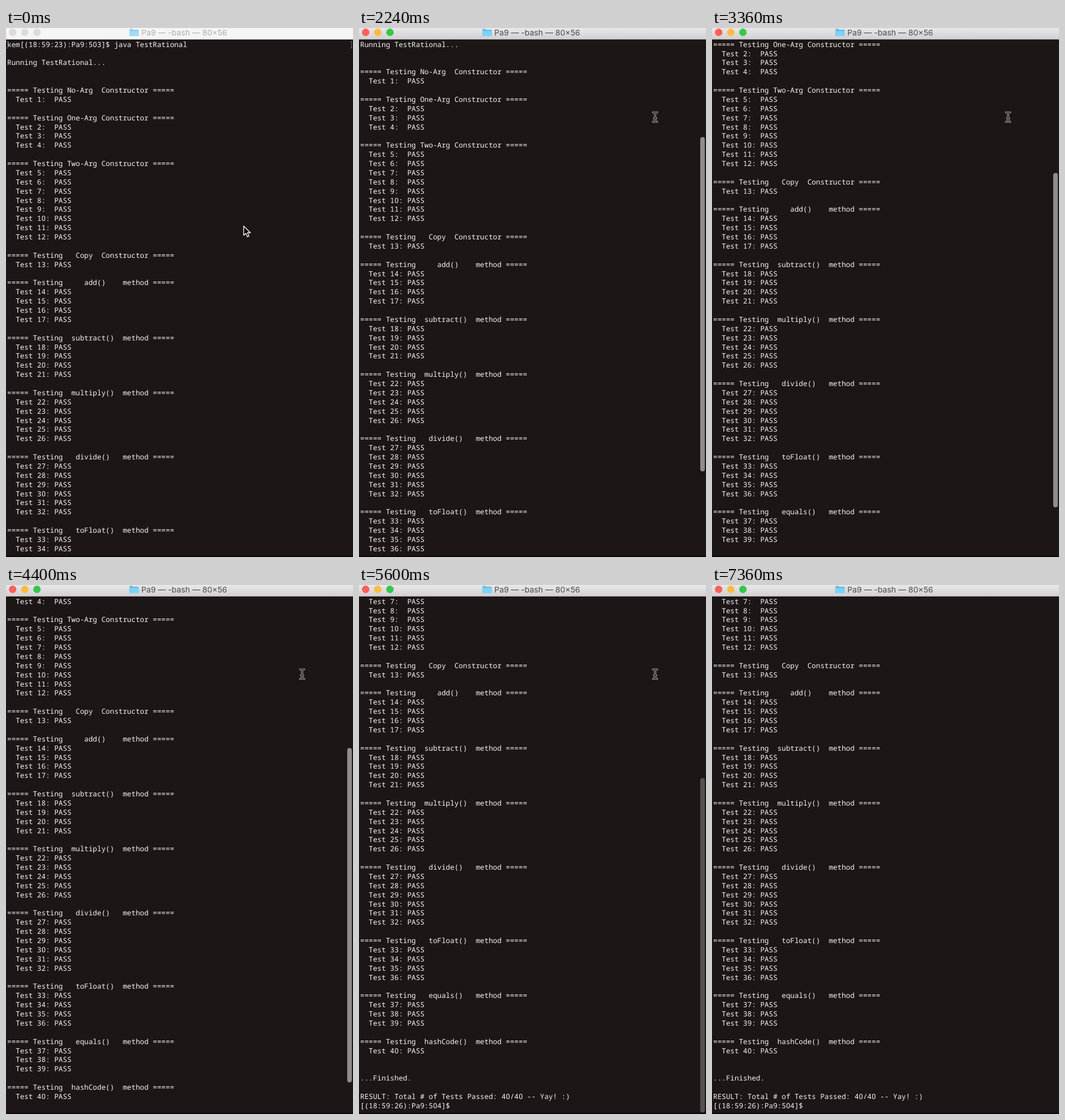
An HTML page that plays this animation: 600x916 px, repeating every 7400 ms.

```html
<!DOCTYPE html>
<html lang="en">
<head>
<meta charset="utf-8">
<title>Terminal test run</title>
<style>
html, body { margin: 0; width: 100%; height: 100%; overflow: hidden; background: #1c1716; }
#stage { position: relative; width: 600px; height: 916px; overflow: hidden; background: #1c1716; }
#stage > * { position: absolute; }
#bar { left: 0; top: 0; width: 600px; height: 19px; background: #f6f5f6; border-bottom: 1px solid #d2d0d1; }
#bar.on { background: linear-gradient(#e9e7e9, #d2d0d2); border-color: #a9a6a8; }
#bar i { position: absolute; top: 1px; width: 13px; height: 13px; border-radius: 50%; background: #dcdbdc; }
#bar.on i { background: var(--c); }
#bar svg { position: absolute; left: 213px; top: 1px; opacity: .7; }
#bar span {
  position: absolute; left: 234px; top: 0; line-height: 16px; white-space: pre;
  font: 13.7px/16px Inter, Roboto, sans-serif; color: #aeadae;
}
#bar.on svg { opacity: 1; }
#bar.on span { color: #4b494b; }
#text {
  left: 2px; top: 20.7px; width: 598px; height: 889px; margin: 0; overflow: hidden;
  font: 12.35px/15.87px "Noto Sans Mono", "DejaVu Sans Mono", monospace;
  text-rendering: geometricPrecision; color: #f6f5f5;
}
#text b { display: inline-block; width: .6em; text-align: center; font: 12.35px/1 Roboto, sans-serif; }
.mark { top: 23px; width: 2px; height: 10px; border: 1px solid #8d8988; }
#open { left: -1px; border-right: 0; }
#close { left: 595px; border-left: 0; border-color: #6f6a69; }
#thumb { left: 590px; top: 168px; width: 8px; height: 579px; border-radius: 4px; background: #8f8c8b; }
#foot { left: 0; top: 914px; width: 600px; height: 2px; background: #080606; }
.pointer { left: 0; top: 0; overflow: visible; }
</style>
</head>
<body>
<div id="stage">
  <pre id="text"></pre>
  <div id="open" class="mark"></div>
  <div id="close" class="mark"></div>
  <div id="thumb"></div>
  <div id="foot"></div>
  <div id="bar">
    <i style="left:5px;--c:#fc605b"></i>
    <i style="left:26px;--c:#fdbc40"></i>
    <i style="left:47px;--c:#34c84a"></i>
    <svg width="17" height="14" viewBox="0 0 17 14">
      <path d="M0.5 12V1.5q0-1 1-1h4.2l1.5 1.6h8.3q1 0 1 1V12q0 1-1 1h-14q-1 0-1-1z" fill="#5fbfe9"/>
      <path d="M0.5 4.2h16V12q0 1-1 1h-14q-1 0-1-1z" fill="#7dd2f7"/>
    </svg>
    <span>Pa9 — -bash — 80×56</span>
  </div>
  <svg id="arrow" class="pointer" width="14" height="22">
    <path d="M0 0v16l3.8-3.5 2.6 6.2 2.7-1.2-2.6-6h5.1z" fill="#0a0808" stroke="#fff" stroke-width="1.3" stroke-linejoin="round"/>
  </svg>
  <svg id="beam" class="pointer" width="12" height="20" fill="none" stroke-linecap="round">
    <g id="shape"><path id="stem" d="M-3.6-8Q0-8 0-5V5.5Q0 8.5-3.6 8.5M3.6-8Q0-8 0-5M0 5.5Q0 8.5 3.6 8.5M-2 2.5H2" stroke="#c4c2c1" stroke-width="3.2"/></g>
    <use href="#stem" style="display:none"/>
    <path d="M-3.6-8Q0-8 0-5V5.5Q0 8.5-3.6 8.5M3.6-8Q0-8 0-5M0 5.5Q0 8.5 3.6 8.5M-2 2.5H2" stroke="#141010" stroke-width="1.3"/>
  </svg>
</div>
<script>
const LOOP = 7400, ROWS = 56;
const ACTIVE = 600, BEAM_OFF = 6500;
// moment at which each further line scrolls off the top
const SCROLLS = [1800, 2040, 2320, 2500, 2680, 2880, 3060, 3240,
                 3520, 3880, 4200, 4480, 4680, 4860, 5040, 5220];
const SECTIONS = [
  ["No-Arg  Constructor", 1], ["One-Arg Constructor", 3], ["Two-Arg Constructor", 8],
  ["  Copy  Constructor", 1], ["    add()    method", 4], [" subtract()  method", 4],
  [" multiply()  method", 5], ["  divide()   method", 6], ["  toFloat()  method", 4],
  ["  equals()   method", 3], [" hashCode()  method", 1]
];

const $ = id => document.getElementById(id);
const clamp = v => Math.max(0, Math.min(1, v));
const ramp = (t, from, to) => clamp((t - from) / (to - from));
const ease = p => p * p * (3 - 2 * p);

function buildLines() {
  const out = ["kem[(18:59:23):Pa9:503]$ java TestRational", "", "Running TestRational...", "", ""];
  let n = 0;
  for (const [title, count] of SECTIONS) {
    out.push(`===== Testing ${title} =====`);
    for (let i = 0; i < count; i++) out.push(`  Test ${(++n + ":").padEnd(3)} PASS`);
    out.push("");
  }
  return out.concat("", "...Finished.", "",
    `RESULT: Total # of Tests Passed: ${n}/${n} -- Yay! :)`, "[(18:59:26):Pa9:504]$");
}

const lines = buildLines();
let shown = -1;

function scrollTo(row) {
  if (row === shown) return;
  shown = row;
  $("text").innerHTML = lines.slice(row, row + ROWS).join("\n").replace(/0/g, "<b>0</b>");
  $("open").hidden = $("close").hidden = row > 0;
  $("open").style.display = $("close").style.display = row ? "none" : "";
  $("thumb").style.transform = `translateY(${row * 10.39}px)`;
}

function draw(t) {
  const active = t >= ACTIVE;
  scrollTo(SCROLLS.filter(s => t >= s).length);
  $("bar").className = active ? "on" : "";
  $("thumb").style.opacity = ramp(t, 1600, 1720) * (1 - ramp(t, 5460, 5740));

  const p = ease(ramp(t, 40, 540));
  $("arrow").style.transform = `translate(${411 + 101 * p}px, ${343 - 189 * p}px)`;
  $("arrow").style.display = active ? "none" : "";
  $("beam").style.transform = "translate(512px, 154px)";
  $("beam").style.display = active && t < BEAM_OFF ? "" : "none";
}

const start = performance.now();
function tick() {
  draw((performance.now() - start) % LOOP);
  requestAnimationFrame(tick);
}
tick();
</script>
</body>
</html>
```
